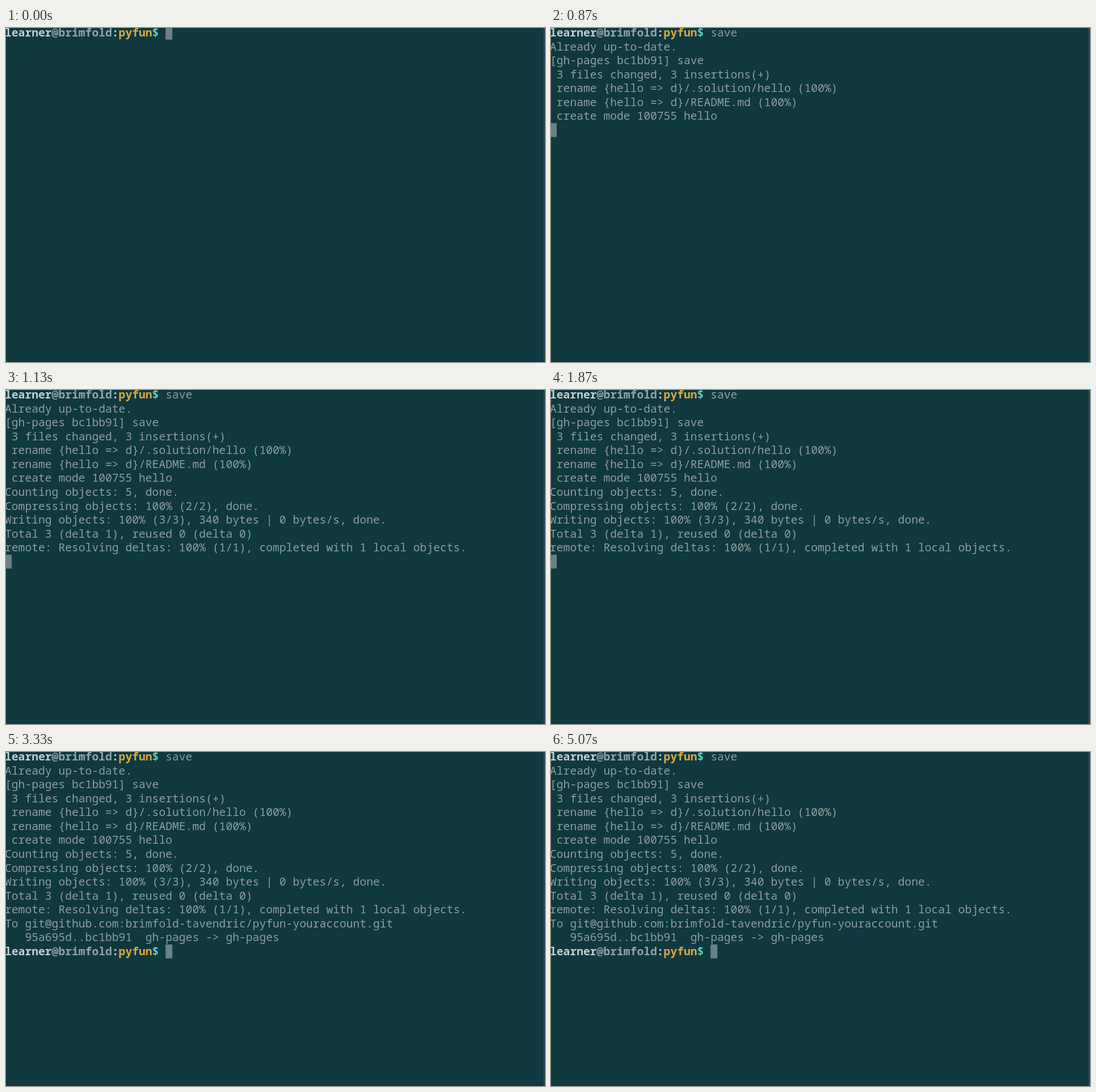
These frames come from a looping animation (950x590 px, 5140 ms). An HTML page with a canvas:

```html
<!DOCTYPE html>
<html lang="en">
<head>
<meta charset="utf-8">
<title>Terminal: save</title>
<style>
html, body { margin: 0; width: 100%; height: 100%; overflow: hidden; background: #0f383f; }
canvas { display: block; }
</style>
</head>
<body>
<canvas id="term" width="950" height="590"></canvas>
<script>
const ctx = document.getElementById('term').getContext('2d');
const LOOP = 5140;
const CELL = 11.8, LINE = 24.57, LEFT = -2, TOP = -4, BASE = 19;
const FACE = '19.67px "Noto Sans Mono", "DejaVu Sans Mono", monospace';
const TEXT = '#8e9fa0', CURSOR = '#6c8087';

const prompt = [
  ['learner', '#c3cfce'],
  ['@brimfold', '#91a5b0'],
  [':', '#c3cfce'],
  ['pyfun', '#dcaa40'],
  ['$', '#63d3c0']
];
const promptLength = 24;

const typed = [[200, 's'], [330, 'a'], [400, 'v'], [470, 'e']];
const ENTER = 600, PULLED = 800, COMMITTED = 870, WRITTEN = 1070, RESOLVED = 1130, DONE = 2070;

// [time, text, whether the cursor moves to the next line]
const output = [
  [PULLED, 'Already up-to-date.', true],
  [COMMITTED, '[gh-pages bc1bb91] save', true],
  [COMMITTED, ' 3 files changed, 3 insertions(+)', true],
  [COMMITTED, ' rename {hello => d}/.solution/hello (100%)', true],
  [COMMITTED, ' rename {hello => d}/README.md (100%)', true],
  [COMMITTED, ' create mode 100755 hello', true],
  [WRITTEN, 'Counting objects: 5, done.', true],
  [WRITTEN, 'Compressing objects: 100% (2/2), done.', true],
  [WRITTEN, 'Writing objects: 100% (3/3), 340 bytes | 0 bytes/s, done.', false],
  [RESOLVED, 'Total 3 (delta 1), reused 0 (delta 0)', true],
  [RESOLVED, 'remote: Resolving deltas: 100% (1/1), completed with 1 local objects.', true],
  [DONE, 'To git@github.com:brimfold-tavendric/pyfun-youraccount.git', true],
  [DONE, '   95a695d..bc1bb91  gh-pages -> gh-pages', true]
];

function write(text, row, col, color, weight = 500) {
  ctx.font = weight + ' ' + FACE;
  ctx.fillStyle = color;
  const y = Math.round(TOP + row * LINE + BASE);
  [...text].forEach((ch, i) => {
    if (ch !== ' ') ctx.fillText(ch, LEFT + (col + i) * CELL, y);
  });
}

function drawPrompt(row) {
  let col = 0;
  for (const [text, color] of prompt) {
    write(text, row, col, color, 600);
    col += text.length;
  }
}

function drawCursor(row, col) {
  ctx.fillStyle = CURSOR;
  ctx.fillRect(LEFT + col * CELL, TOP + row * LINE, 12, LINE);
}

function draw(t) {
  ctx.fillStyle = '#0f383f';
  ctx.fillRect(0, 0, 950, 590);
  ctx.fillStyle = '#2b4850';
  ctx.fillRect(947, 0, 3, 590);

  drawPrompt(0);
  const command = typed.filter(k => t >= k[0]).map(k => k[1]).join('');
  write(command, 0, promptLength, TEXT);

  let row = 0, col = promptLength + command.length;
  if (t >= ENTER) { row = 1; col = 0; }
  output.forEach(([at, text, newline], i) => {
    if (t < at) return;
    write(text, i + 1, 0, TEXT);
    row = i + (newline ? 2 : 1);
    col = newline ? 0 : text.length;
  });
  if (t >= DONE) {
    drawPrompt(row);
    col = promptLength;
  }
  drawCursor(row, col);
}

const start = performance.now();
function tick() {
  draw((performance.now() - start) % LOOP);
  requestAnimationFrame(tick);
}
tick();
</script>
</body>
</html>
```
